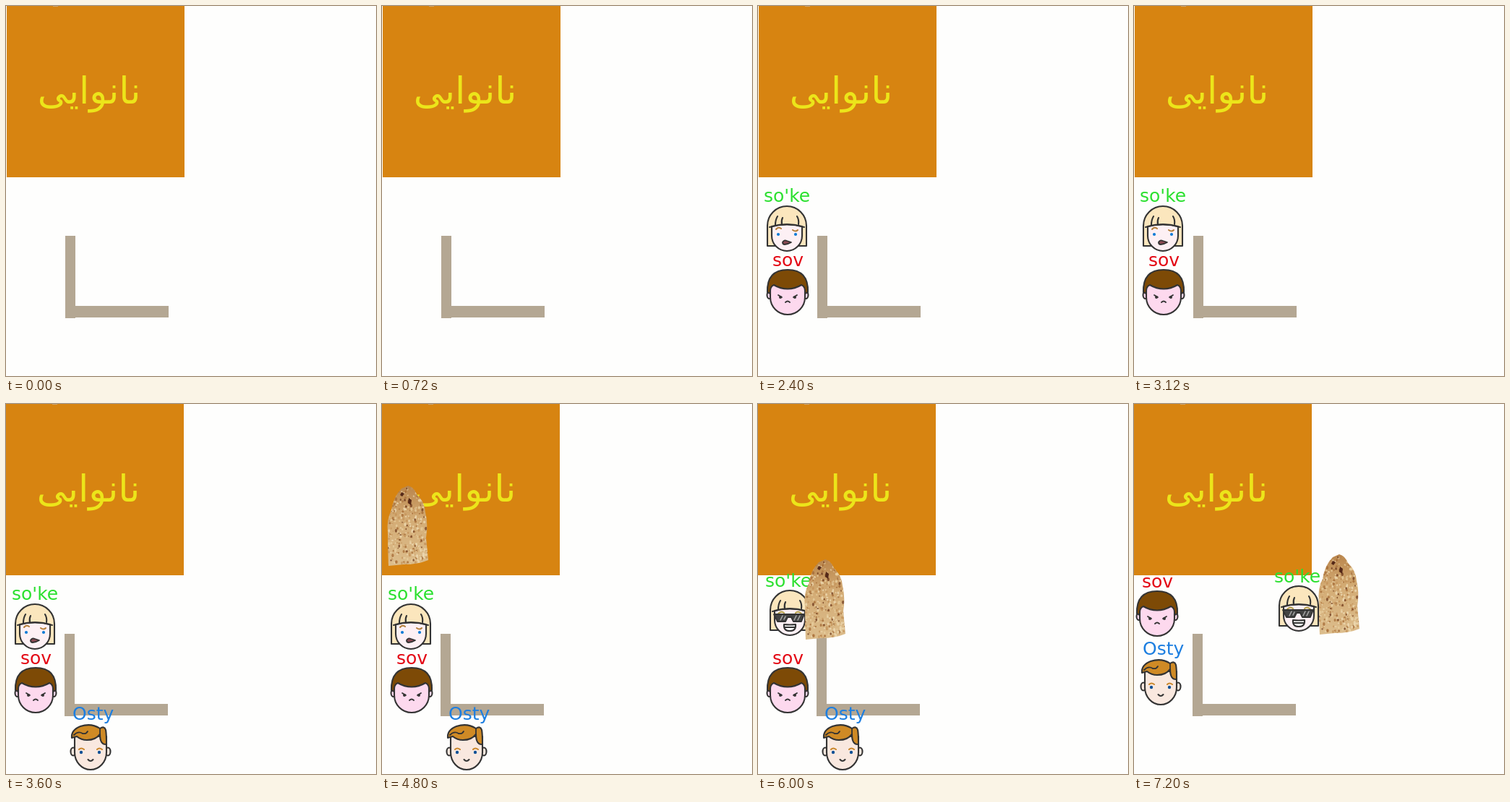
These frames come from a looping animation (512 by 512 pixels, 8 s). An HTML page:

```html
<!DOCTYPE html>
<html lang="fa">
<head>
<meta charset="utf-8">
<style>
  html, body { margin: 0; width: 100%; height: 100%; overflow: hidden; background: #fefefd; }
  svg { display: block; width: 100vw; height: 100vh; }
  text { font: 25px "DejaVu Sans", sans-serif; }
  .sign { font-size: 51.5px; fill: #ece51a; text-anchor: middle; direction: rtl; }
  .face { stroke: #333; stroke-width: 2.1; stroke-linecap: round; stroke-linejoin: round; }
  .line { fill: none; }
  .thin { stroke-width: 1.8; }
  .dot { stroke: none; }
</style>
</head>
<body>
<svg viewBox="0 0 512 512">
  <defs>
    <clipPath id="crust">
      <path id="loaf" d="M36 113Q44 115 48 125Q59 135 60 150Q64 166 61 185L64 216Q50 222 30 222L9 224Q8 200 8 178Q6 160 13 147Q16 128 27 117Z"/>
    </clipPath>
    <linearGradient id="bake" x2="0" y2="1">
      <stop stop-color="#b9854c"/>
      <stop offset=".4" stop-color="#d3ab74"/>
      <stop offset="1" stop-color="#dcbd8c"/>
    </linearGradient>
  </defs>

  <g id="scene">
    <path fill="#d78411" d="M1 0H247V237H1Z"/>
    <path fill="#cfa268" d="M65 0h7v1h-7z"/>
    <text class="sign" x="115" y="135.3">نانوایی</text>
    <path fill="#b4a793" d="M82 318H96V415H225V431H96V432H82Z"/>
  </g>

  <g id="boy">
    <text x="20" y="360" fill="#e30613">sov</text>
    <g class="face">
      <g fill="#fdd9ee">
        <ellipse cx="16" cy="400" rx="3.5" ry="5"/>
        <ellipse cx="66" cy="400" rx="3.5" ry="5"/>
        <path d="M17 385V403A24 24 0 0 0 65 403V385Z"/>
      </g>
      <path fill="#7d4a06" d="M13 396Q12 365 41 365Q70 365 69 396L65 398Q66 388 60 386Q51 391.5 41 391.5Q31 391.5 22 386Q16 388 17 398Z"/>
      <path class="line thin" d="M28 400L33 403M54 400L49 403M38 410Q41 407 44 410"/>
      <circle class="dot" cx="31" cy="403" r="2" fill="#333"/>
      <circle class="dot" cx="51" cy="403" r="2" fill="#333"/>
    </g>
  </g>

  <g id="friend">
    <text x="92" y="437" fill="#1c7ee0">Osty</text>
    <g class="face">
      <g fill="#f9e8df">
        <ellipse cx="93" cy="481" rx="3.5" ry="5.5"/>
        <ellipse cx="141" cy="481" rx="3.5" ry="5.5"/>
        <path d="M95 460V482A22 24 0 0 0 139 482V460Z"/>
      </g>
      <path fill="#cf8a25" d="M91 462Q90 451 103 446Q118 441 130 449Q136 445 138 451Q139 456 139 471Q130 472 130 457Q124 465 112 465Q104 465 98 460Q94 461 91 462Z"/>
      <path class="line thin" d="M94 458Q100 452 106 456Q111 457 113 453M130 449V458"/>
      <path class="line" stroke="#c98528" d="M101 478Q104 475 108 478M126 478Q129 475 133 478"/>
      <path class="line" d="M113.5 492Q117 496 120.5 492"/>
      <g class="dot" fill="#0f5196"><circle cx="104" cy="482" r="2.2"/><circle cx="129" cy="482" r="2.2"/></g>
    </g>
  </g>

  <g id="girl">
    <text x="8" y="271" fill="#2be02f">so'ke</text>
    <g class="face" id="girlHead">
      <path fill="#fbe6bd" d="M13 332V304A27 27 0 0 1 67 304V332Z"/>
      <path fill="#fdf0f4" d="M19 305V318A21 21 0 0 0 61 318V305Q40 299 19 305Z"/>
      <path class="line" d="M16 306Q40 299 64 306M27 291Q24 296 24 303M34 293Q32 297 33 302M54 291Q57 296 56 302"/>
      <g id="worried">
        <path class="line" stroke="#b5803c" d="M25 309Q28 305 32 308M48 310Q52 313 55 310"/>
        <g class="dot" fill="#0a7ad6"><circle cx="28" cy="316" r="2.1"/><circle cx="52" cy="316" r="2.1"/></g>
        <path class="thin" fill="#8c4a54" d="M34 327Q36 323 40 325L46 327Q41 330 37 330Q34 330 34 327Z"/>
      </g>
      <g id="cool">
        <path class="line" stroke="#b5a04c" d="M24 309Q28 305 32 308M48 308Q52 305 56 309"/>
        <path class="thin" fill="#444" d="M18 310H60L56 320H45L42 314H37L34 320H23Z"/>
        <path class="line" stroke="#aaa" stroke-width="1.5" d="M27 318L30 312M32 317L34 313M46 318L49 312M51 318L54 312"/>
        <path fill="#fff" d="M32 324Q40 325 48 324Q49 333 40 333Q31 333 32 324Z"/>
        <path class="line thin" d="M33 328H47"/>
      </g>
    </g>
  </g>

  <g id="bread">
    <use href="#loaf" fill="url(#bake)"/>
    <g id="specks" clip-path="url(#crust)"></g>
  </g>
</svg>
<script>
const $ = id => document.getElementById(id);
const move = (id, x, y) => $(id).setAttribute("transform", `translate(${x} ${y})`);
const show = (id, on) => $(id).setAttribute("display", on ? "inline" : "none");

const STEP = 1200, LOOP = 8000;

// Baked texture: pale flour first, then ever fewer and darker scorch marks.
let seed = 7;
const random = () => (seed = seed * 16807 % 2147483647) / 2147483647;
const tones = ["#efddb6", "#c4935a", "#e9cf9f", "#a56a35", "#6f3a1c"];
let specks = "";
tones.forEach((tone, i) => {
  for (let n = 150 - 28 * i; n > 0; n--) {
    const x = 7 + random() * 57, y = 113 + random() * 110, r = 0.5 + random() * 1.2;
    specks += `<ellipse cx="${x}" cy="${y}" rx="${r}" ry="${r * (0.6 + random())}" fill="${tone}" opacity=".75"/>`;
  }
});
specks += '<path fill="#542818" d="M37 130l4 3-1 7-4-3zM27 122l4 2-3 4-3-2z"/>';
$("specks").innerHTML = specks;

function draw(now) {
  const step = Math.floor(now % LOOP / STEP);
  const served = step >= 5, left = step === 6;

  move("scene", step >= 3 ? -1 : 0, 0);

  show("girl", step >= 1);
  show("worried", !served);
  show("cool", served);
  move("girl", ...(left ? [186, -24] : served ? [2, -18] : [0, 0]));
  move("girlHead", served ? 2 : 0, served ? -1 : 0);

  show("boy", step >= 2);
  move("boy", left ? -9 : 0, left ? -106 : 0);

  show("friend", step >= 3);
  move("friend", left ? -80 : 0, left ? -90 : 0);

  show("bread", step >= 4);
  move("bread", ...(left ? [248, 95] : served ? [57, 102] : [0, 0]));

  requestAnimationFrame(draw);
}
draw(performance.now());
</script>
</body>
</html>
```
